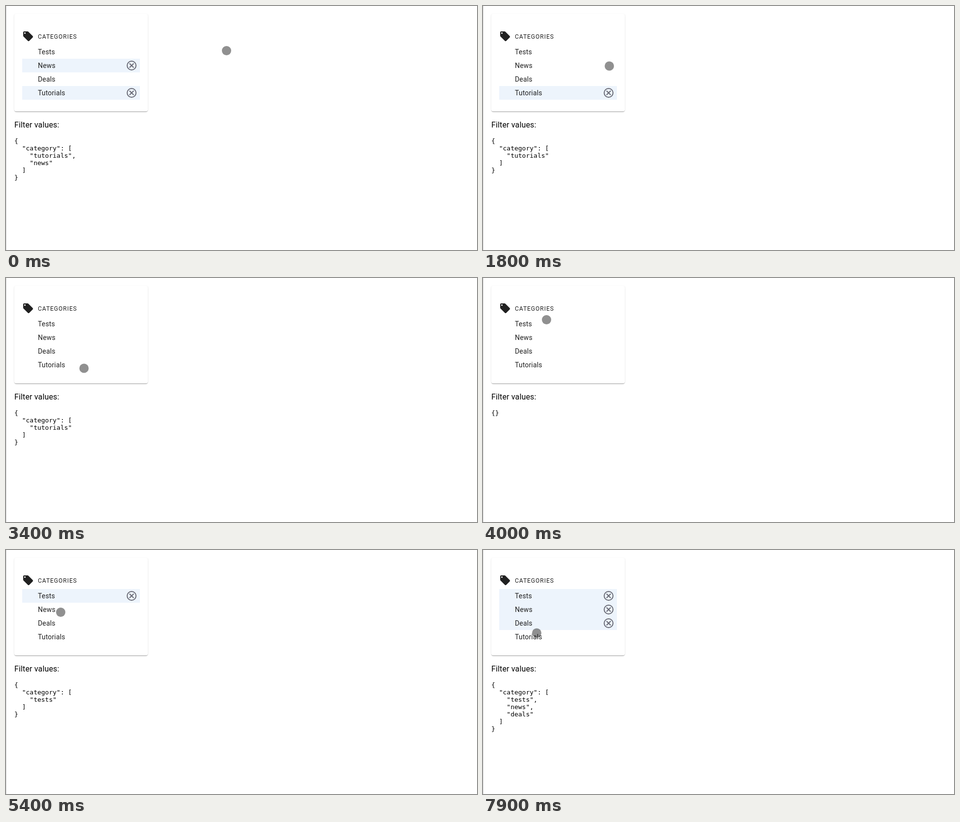
Write an HTML page that moves like this. It is 960 by 500 pixels and loops after 8000 ms.

```html
<!DOCTYPE html>
<html lang="en">
<head>
<meta charset="utf-8">
<title>Category filter</title>
<style>
  html, body { margin: 0; width: 960px; height: 500px; overflow: hidden; background: #fff; }
  body { position: relative; }
  .card {
    position: absolute; left: 17px; top: 16px; width: 272px; height: 200px;
    border-radius: 4px; background: #fff;
    box-shadow: 0 2px 1px -1px rgba(0,0,0,.2), 0 1px 1px rgba(0,0,0,.14), 0 1px 3px rgba(0,0,0,.12);
  }
  svg { position: absolute; left: 0; top: 0; display: block; }
  text { font-family: Roboto, sans-serif; fill: #212121; }
  .head { font-size: 12px; letter-spacing: .08333em; }
  .item { font-size: 14px; letter-spacing: .01071em; }
  .label { font-size: 16px; letter-spacing: .00938em; fill: #000; }
  .json { font: 13px "DejaVu Sans Mono", monospace; fill: #000; white-space: pre; }
</style>
</head>
<body>
<div class="card"></div>
<svg width="960" height="500" viewBox="0 0 960 500">
  <defs>
    <g id="clear" fill="none" stroke="#6a6b76" stroke-width="2">
      <circle r="9"/>
      <path d="M-4.3-4.3L4.3 4.3M4.3-4.3L-4.3 4.3"/>
    </g>
  </defs>
  <rect width="1" height="500" fill="#d8d8d8"/>
  <g transform="translate(33 50)">
    <path d="M4 4h7l9 9-7 7-9-9z" fill="#212121" stroke="#212121" stroke-width="4" stroke-linejoin="round"/>
    <circle cx="5.5" cy="5.5" r="1.5" fill="#fff"/>
  </g>
  <text class="head" x="65" y="67">CATEGORIES</text>
  <g id="rows"></g>
  <text class="label" x="17" y="249">Filter values:</text>
  <g id="json"></g>
  <circle id="pointer" r="9.5" fill="#212121" fill-opacity=".5"/>
</svg>
<script>
const LOOP = 8000, STEP = 100, JSON_DELAY = 100;
const names = ['Tests', 'News', 'Deals', 'Tutorials'];
const initial = ['tutorials', 'news'];
const clicks = [
  { at: 1700, value: 'news' },
  { at: 3400, value: 'tutorials' },
  { at: 4800, value: 'tests' },
  { at: 6000, value: 'news' },
  { at: 7400, value: 'deals' }
];

// The pointer rests between moves and eases to the end of each one
const home = { x: 449.5, y: 91.5 };
const moves = [
  { from: 0, to: 900, x: 257.5, y: 123 },
  { from: 2000, to: 2300, x: 192.5, y: 151.5 },
  { from: 2300, to: 2600, x: 159, y: 185 },
  { from: 3500, to: 4000, x: 129.5, y: 85.5 },
  { from: 4200, to: 4400, x: 130, y: 88.5 },
  { from: 4800, to: 5400, x: 111.5, y: 127.5 },
  { from: 6200, to: 6600, x: 111.5, y: 153.5 },
  { from: 7800, to: 7900, x: 109.5, y: 170 }
];

const $ = id => document.getElementById(id);
const ease = u => u * u * (3 - 2 * u);

function make(tag, parent, attrs, text) {
  const el = document.createElementNS('http://www.w3.org/2000/svg', tag);
  for (const name in attrs) el.setAttribute(name, attrs[name]);
  if (text) el.textContent = text;
  return parent.appendChild(el);
}

const marks = names.map((name, i) => {
  const y = 80 + 28 * i;
  const mark = make('g', $('rows'), {});
  make('rect', mark, { x: 33, y, width: 240, height: 28, fill: '#edf4fc' });
  make('use', mark, { href: '#clear', x: 256, y: y + 14 });
  make('text', $('rows'), { class: 'item', x: 65, y: y + 19 }, name);
  return mark;
});

const lines = Array.from({ length: 7 }, (_, i) =>
  make('text', $('json'), { class: 'json', x: 17, y: 281 + 15 * i }));

function selection(t) {
  let list = initial;
  for (const { at, value } of clicks) {
    if (t < at) break;
    list = list.includes(value) ? list.filter(v => v !== value) : [...list, value];
  }
  return list;
}

function pointerAt(t) {
  let { x, y } = home;
  for (const move of moves) {
    if (t < move.from) break;
    const k = ease(Math.min(1, (t - move.from) / (move.to - move.from)));
    x += (move.x - x) * k;
    y += (move.y - y) * k;
  }
  return { x, y };
}

function draw(t) {
  const selected = selection(t);
  names.forEach((name, i) => {
    marks[i].style.display = selected.includes(name.toLowerCase()) ? '' : 'none';
  });
  const category = selection(t - JSON_DELAY);
  const text = JSON.stringify(category.length ? { category } : {}, null, 2).split('\n');
  lines.forEach((line, i) => { line.textContent = text[i] || ''; });
  const { x, y } = pointerAt(t);
  $('pointer').setAttribute('cx', x);
  $('pointer').setAttribute('cy', y);
}

let start;
function tick(now) {
  if (start === undefined) start = now;
  const t = (now - start) % LOOP;
  draw(Math.floor(t / STEP) * STEP);
  requestAnimationFrame(tick);
}
draw(0);
requestAnimationFrame(tick);
</script>
</body>
</html>
```
